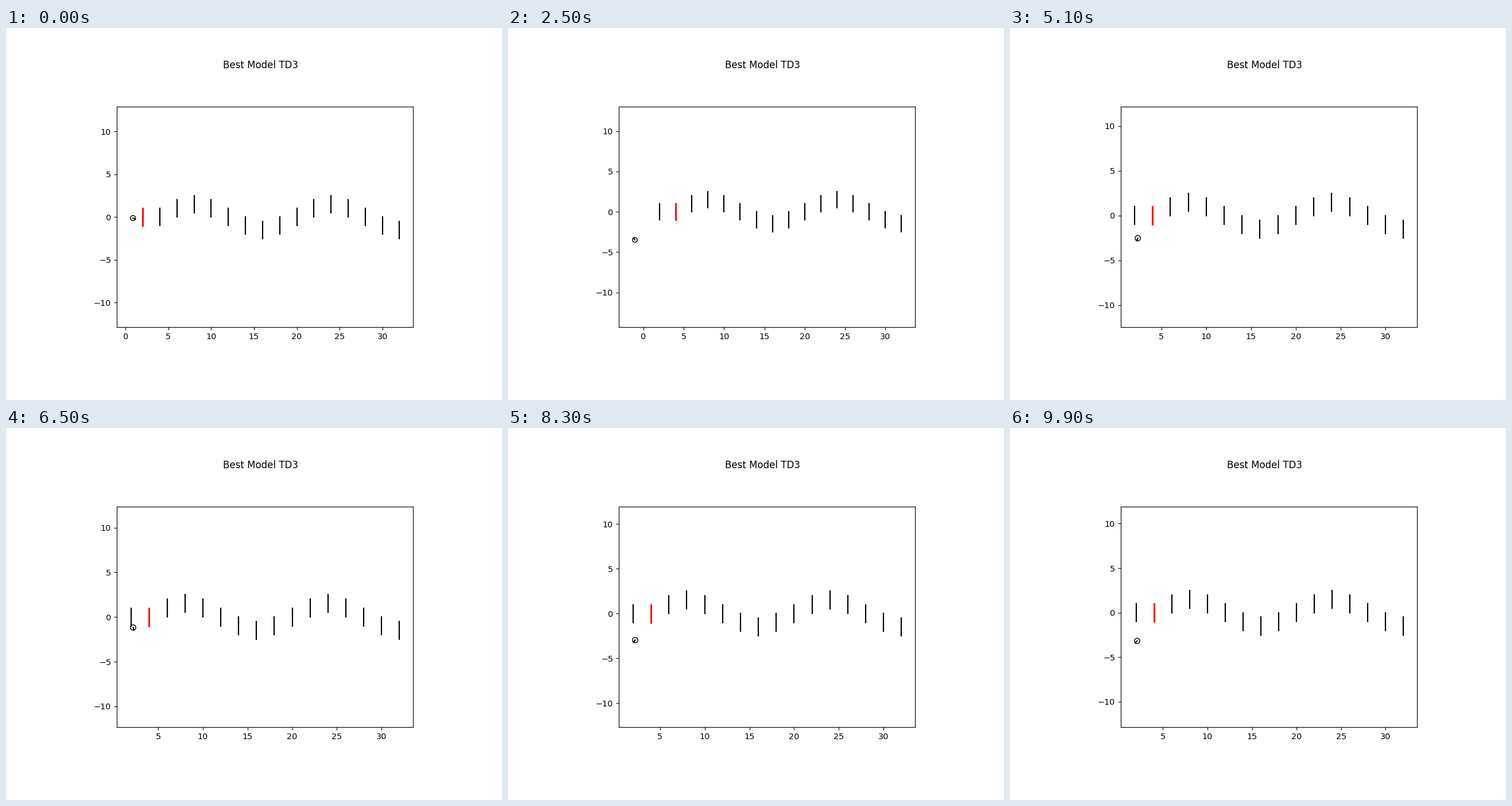
Write a matplotlib script that moves like this. It is 864x648 px and loops after 10 s.

```python
import matplotlib.pyplot as plt
import numpy as np
from matplotlib.animation import FuncAnimation
from matplotlib.patches import Circle
from matplotlib.ticker import MultipleLocator

W, H, DPI = 864, 648, 100
FRAMES, INTERVAL = 100, 100

# The plot is a 640x480 chart enlarged to fit the default axes area.
ZOOM = 0.77 * H / 480
LEFT = 442.8 - 320 * ZOOM + 80 * ZOOM
BOTTOM = 0.11 * H + 52.8 * ZOOM + 0.5
BOX_W, BOX_H = 496 * ZOOM, 369.6 * ZOOM

GATE_X = 2 * np.arange(1, 17)
WAVE = [0, 1, 1.5, 1, 0, -1, -1.5, -1]
GATE_Y = [0] + [WAVE[i % 8] for i in range(15)]

BODY = 0.3                 # agent radius
TURN = 0.4                 # radians per step, clockwise
ORBIT = 2.02
CENTER = np.array([0.4, -2.09])
START = np.radians(76.6)

plt.rcParams["font.family"] = "DejaVu Sans"
fig = plt.figure(figsize=(W / DPI, H / DPI), dpi=DPI, facecolor="white")
fig.text(443.8 / W, 1 - 70.4 / H, "Best Model TD3",
         size=12, ha="center", va="baseline")

ax = fig.add_axes([LEFT / W, BOTTOM / H, BOX_W / W, BOX_H / H])
ax.tick_params(labelsize=10 * ZOOM, length=3.5 * ZOOM,
               width=0.8 * ZOOM, pad=3.5 * ZOOM)
for spine in ax.spines.values():
    spine.set_linewidth(0.8 * ZOOM)
for axis in (ax.xaxis, ax.yaxis):
    axis.set_major_locator(MultipleLocator(5))

gates = [ax.plot([x, x], [y - 1, y + 1])[0] for x, y in zip(GATE_X, GATE_Y)]
body = ax.add_patch(Circle((0, 0), BODY, fill=False, ec="black", lw=ZOOM))
nose, = ax.plot([], [], color="black", lw=1.5 * ZOOM)


def fit_view(x, y):
    """Equal-aspect limits around the gates and the agent, 5% margins."""
    lo = min(x - BODY, GATE_X[0])
    hi = GATE_X[-1]
    span = 1.1 * (hi - lo)
    mid_x = (lo + hi) / 2
    mid_y = (2.5 + min(-2.5, y - BODY)) / 2
    half_h = span * BOX_H / BOX_W / 2
    ax.set_xlim(mid_x - span / 2, mid_x + span / 2)
    ax.set_ylim(mid_y - half_h, mid_y + half_h)


def update(n):
    phi = START - TURN * n
    x, y = CENTER + ORBIT * np.array([np.cos(phi), np.sin(phi)])
    heading = phi - np.pi / 2 - TURN / 2

    target = 0 if n < 2 else 1
    for i, gate in enumerate(gates):
        active = i == target
        gate.set_color("red" if active else "black")
        gate.set_linewidth((2 if active else 1.5) * ZOOM)

    body.center = x, y
    nose.set_data([x, x + BODY * np.cos(heading)],
                  [y, y + BODY * np.sin(heading)])
    fit_view(x, y)
    return [*gates, body, nose]


anim = FuncAnimation(fig, update, frames=FRAMES, interval=INTERVAL,
                     repeat=True, repeat_delay=0, blit=False)
plt.show()
```
